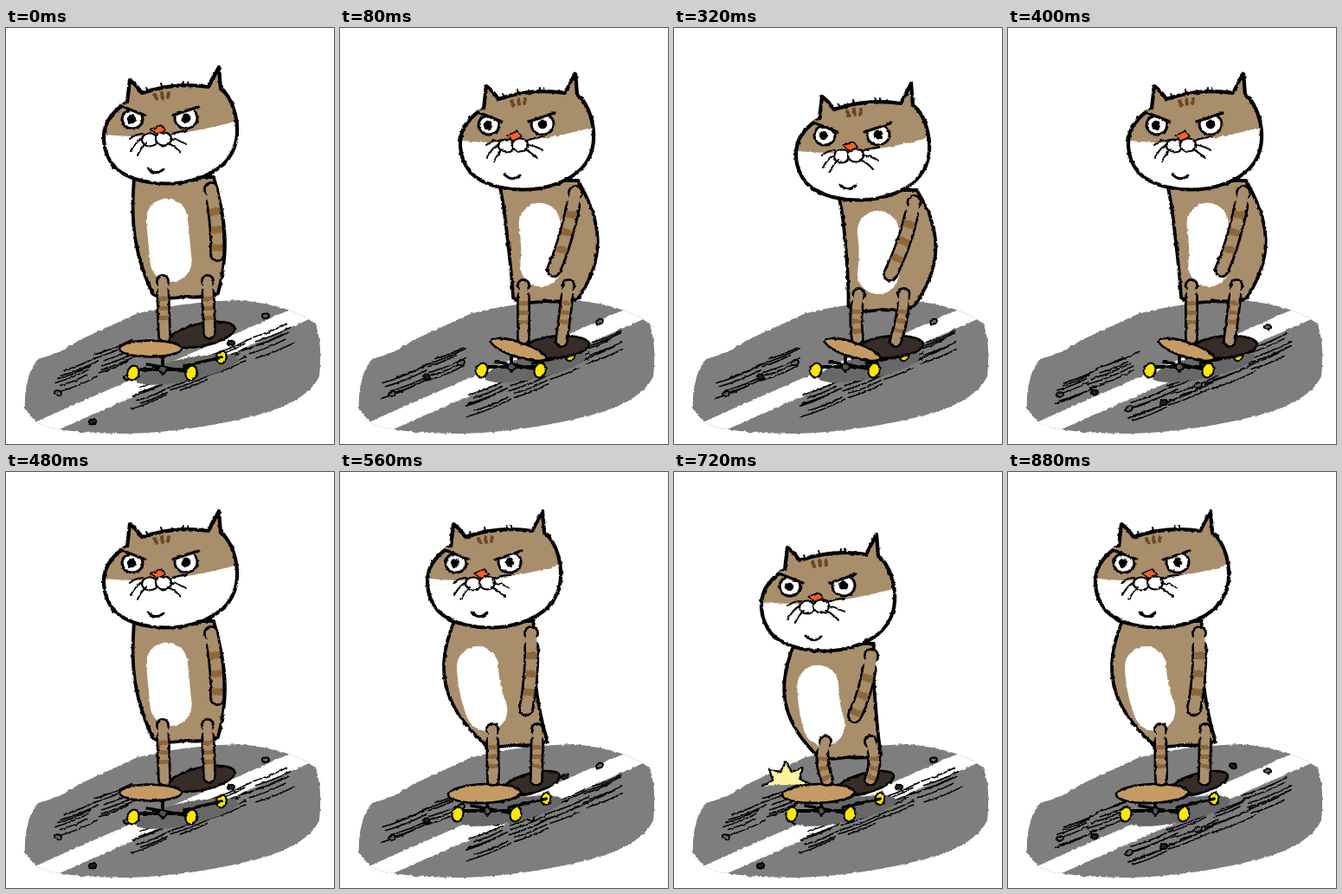
An HTML page that plays this animation: 379x480 px, repeating every 960 ms.

```html
<!DOCTYPE html>
<html lang="en">
<head>
<meta charset="utf-8">
<title>Skating cat</title>
<style>
html, body { margin: 0; width: 100%; height: 100%; overflow: hidden; background: #fff; }
svg { display: block; width: 100vw; height: 100vh; stroke-linecap: round; stroke-linejoin: round; }
</style>
</head>
<body>
<svg viewBox="0 0 379 480">
  <defs>
    <filter id="ink" filterUnits="userSpaceOnUse" x="0" y="0" width="379" height="480" color-interpolation-filters="sRGB">
      <feTurbulence type="fractalNoise" baseFrequency=".2" numOctaves="2" seed="4"/>
      <feDisplacementMap in="SourceGraphic" scale="3" xChannelSelector="R" yChannelSelector="G"/>
    </filter>
    <path id="skull" d="M140 86L143 60Q151 66 157 75Q195 62 234 68L246 45L248 70C262 80 268 105 267 122C265 155 238 172 205 178C170 183 140 175 125 160C110 142 109 116 122 101Q130 91 140 86Z"/>
    <clipPath id="skullClip"><use href="#skull"/></clipPath>
    <path id="road" d="M22 440Q20 405 37 382Q62 376 85 360L150 330Q200 316 270 314Q330 320 357 341Q366 360 362 402Q350 428 300 444Q220 466 140 468Q60 468 35 455Z"/>
    <clipPath id="roadClip"><use href="#road"/></clipPath>
  </defs>
  <g id="scene" filter="url(#ink)"></g>
</svg>
<script>
const FUR = '#a98e6c', STRIPE = '#8f6638', ROAD = '#7e7e7e', INK = '#000';
const draw = (d, fill = 'none', stroke = INK, width = 2, extra = '') =>
  `<path d="${d}" fill="${fill}" stroke="${stroke}" stroke-width="${width}" ${extra}/>`;
const ellipse = (x, y, rx, ry, fill, width = 0, turn = 0) =>
  `<ellipse cx="${x}" cy="${y}" rx="${rx}" ry="${ry}" fill="${fill}" stroke="${width ? INK : 'none'}" stroke-width="${width}" transform="rotate(${turn} ${x} ${y})"/>`;
const add = ([x, y], dx, dy) => [x + dx, y + dy];
const mix = (a, b, t) => a.map((v, i) => v + (b[i] - v) * t);
const range = (n, f) => Array.from({ length: n }, (_, i) => f(i));

function randomFrom(seed) {
  return () => (seed = seed * 16807 % 2147483647) / 2147483647;
}

// Key poses: head is an offset; the spine bends from neck through bow to hip
const stand = { head: [0, 0], neck: [194, 172], bow: [201, 240], hip: [207, 306], hand: [244, 261] };
const right = {
  up: { head: [26, 7], neck: [229, 176], bow: [258, 246], hip: [238, 311], hand: [247, 279] },
  low: { head: [30, 31], neck: [240, 198], bow: [270, 260], hip: [241, 331], hand: [253, 289] }
};
const left = {
  up: { head: [-12, 0], neck: [178, 172], bow: [158, 248], hip: [202, 311], hand: [215, 273] },
  low: { head: [-12, 27], neck: [185, 198], bow: [168, 268], hip: [201, 325], hand: [209, 281] }
};
const crouchTo = ({ up, low }, t) => Object.fromEntries(Object.keys(up).map(k => [k, mix(up[k], low[k], t)]));

// Boards: nose and deck are x, y, length, tilt
const boards = {
  flat: { front: [147, 398], nose: [167, 370, 36, 0], deck: [226, 354, 39, -12], feet: [[183, 355], [235, 352]] },
  right: { front: [164, 395], nose: [206, 371, 33, 18], deck: [250, 368, 38, -5], feet: [[212, 358], [256, 361]] },
  left: { front: [136, 395], nose: [167, 371, 42, -2], deck: [221, 359, 34, -15], feet: [[177, 355], [227, 355]] }
};

function drawBoard({ front, nose, deck }) {
  const [x, y] = front, near = [x + 67, y], far = [x + 102, y - 18];
  const wheel = ([cx, cy], size) => ellipse(cx, cy, 6.5 * size, 8.5 * size, '#ffe800', 2.2, 15);
  const plank = ([cx, cy, length, tilt], slim, color) => ellipse(cx, cy, length, length * slim, color, 2.8, tilt);
  return ellipse(x + 62, y - 4, 60, 13, '#686868', 0, -12) + wheel(far, .85) +
    draw(`M${x} ${y - 4}H${near[0]}M${x + 16} ${y - 10}L${near[0] - 8} ${y - 2}M${x + 34} ${y + 1}V${y - 16}M${near[0] - 8} ${y - 8}L${far}`, 'none', INK, 3.8) +
    ellipse(x + 34, y - 4, 4, 4, '#555', 2) + wheel(front, 1) + wheel(near, 1) +
    plank(deck, .33, '#362d28') + plank(nose, .26, '#c69b63');
}

// Furry limb: its outline starts below the joint so that the joint blends in
function limb(d, width, skip, bands) {
  return draw(d, 'none', INK, width, `stroke-dasharray="0 ${skip} 400"`) + draw(d, 'none', FUR, width - 5.5) +
    draw(d, 'none', STRIPE, width - 6, `stroke-linecap="butt" stroke-dasharray="${bands}"`);
}

function drawBody({ neck, bow, hip, hand }, feet, crouch) {
  const spine = t => mix(mix(neck, bow, t), mix(bow, hip, t), t);
  const girth = t => 46 + 7 * Math.sin(Math.PI * t) - 8 * t ** 3;
  const side = s => range(13, i => add(spine(i / 12), s * girth(i / 12), 0));
  const rightSide = side(1).reverse();
  const torso = `M${side(-1).join('L')}Q${add(hip, -28, 9)} ${add(hip, 0, 4)}Q${add(hip, 28, 6)} ${rightSide.join('L')}Z`
    .replace(/(Q\S+ \S+?,\S+?)L/, '$1L');
  const belly = 'M' + range(7, i => add(spine(.36 + i * .06), -13, 0)).join('L');
  const legs = feet.map((foot, i) => {
    const s = i ? 1 : -1, joint = add(hip, s * 26, -14);
    const knee = add(mix(joint, foot, .5), s * 9 * crouch, 0);
    return limb(`M${joint}Q${knee} ${foot}`, 16, 14, '0 18 5 6 5 6 5 99');
  });
  const shoulder = add(neck, 43, 14), elbow = add(mix(shoulder, hand, .5), 5, 4);
  return draw(torso, FUR, INK, 3.8) + draw(belly, 'none', '#fff', 48) + legs.join('') +
    limb(`M${shoulder}Q${elbow} ${hand}`, 18, 16, '0 22 8 13 8 13 8 99');
}

const face =
  ellipse(146, 105, 12, 11, '#fff', 3) + ellipse(208, 104, 13, 12, '#fff', 3) +
  draw('M133 89L160 101L160 88ZM193 101L222 91L200 85Z', FUR, FUR, 3) +
  draw('M133 90L161 101M192 101L222 91', 'none', INK, 3.2) +
  ellipse(145, 105, 5.2, 5.2, INK) + ellipse(208, 104, 5.4, 5.4, INK) +
  ellipse(166, 129, 9, 7.5, '#fff', 2.2) + ellipse(182, 128, 9, 7.5, '#fff', 2.2) +
  draw('M167 117L179 112L184 118L175 123Z', '#f4602a', INK, 1.4) +
  draw('M158 122Q150 122 143 128M158 127Q150 131 144 142M162 133Q156 138 152 147M190 123Q198 119 209 119M190 128Q198 128 208 134M187 133Q195 136 202 144', 'none', INK, 2) +
  draw('M164 162Q173 171 182 163', 'none', INK, 3);

const drawHead = ([dx, dy]) => `<g transform="translate(${dx} ${dy})">
    <use href="#skull" fill="${FUR}"/>
    <g clip-path="url(#skullClip)">${draw('M105 122Q150 127 175 124Q220 121 275 105V190H105Z', '#fff', 'none')}</g>
    ${draw('M172 77L174 82M180 75L181 81M188 75L187 80', 'none', '#6b4726', 4)}
    ${draw('M165 74L162 69M181 70L179 64M204 67L205 62M211 67L210 62', 'none', INK, 2)}
    <use href="#skull" fill="none" stroke="#000" stroke-width="4.2"/>${face}</g>`;

const stripeY = x => 460 - .44 * (x - 45);

function drawRoad(k) {
  const rand = randomFrom(9001 * (k + 3));
  let streaks = '';
  for (let g = 0; g < 6; g++) {
    const x = 78 + 45 * g, y = stripeY(x) + (g < 2 ? -46 : 14) + 7 * k;
    for (let j = -2.5; j < 3; j++) {
      const length = 30 + 24 * rand();
      streaks += `M${x - length / 2 + 16 * (rand() - .5)} ${y + 4.6 * j + length / 5}q${length / 2} ${-length * .14} ${length} ${-length * .4}`;
    }
  }
  const stones = range(7, i => {
    const x = 60 + 40 * i;
    return ellipse(x, stripeY(x) + 70 * (rand() - .5), 4.2, 2.8, i % 2 ? '#222' : '#666', 2, 60 * rand() - 30);
  });
  return `<use href="#road" fill="${ROAD}"/><g clip-path="url(#roadClip)">` +
    draw(`M30 ${stripeY(30)}L365 ${stripeY(365)}`, 'none', '#fff', 19) +
    draw(streaks, 'none', INK, 1.6) + stones.join('') + '</g>';
}

// Half a star whose spikes fan out from the given angle
function drawSpark(x, y, from) {
  const points = range(9, i => {
    const a = (from + i * 22) * Math.PI / 180, r = i % 2 ? 17 : 28;
    return [x + r * Math.cos(a), y + r * Math.sin(a)];
  });
  const edge = 'M' + points.join('L');
  return draw(edge + 'Z', '#fff3a0', 'none') + draw(edge, 'none', INK, 2.2);
}

function drawCel(i) {
  const way = i % 6 === 0 ? 'flat' : i < 6 ? 'right' : 'left';
  const crouch = way === 'flat' ? 0 : 1 - Math.abs(i % 6 - 3) / 2;
  const pose = way === 'flat' ? stand : crouchTo(way === 'right' ? right : left, crouch);
  const spark = crouch < 1 ? '' : way === 'right' ? drawSpark(287, 382, -75) : drawSpark(130, 362, 180);
  return drawRoad(i % 3) + spark + drawBoard(boards[way]) +
    drawBody(pose, boards[way].feet, crouch) + drawHead(pose.head);
}

const cels = range(12, drawCel);
const scene = document.getElementById('scene');
let shown = -1;
function tick() {
  const i = Math.floor(performance.now() % 960 / 80);
  if (i !== shown) scene.innerHTML = cels[shown = i];
  requestAnimationFrame(tick);
}
tick();
</script>
</body>
</html>
```
